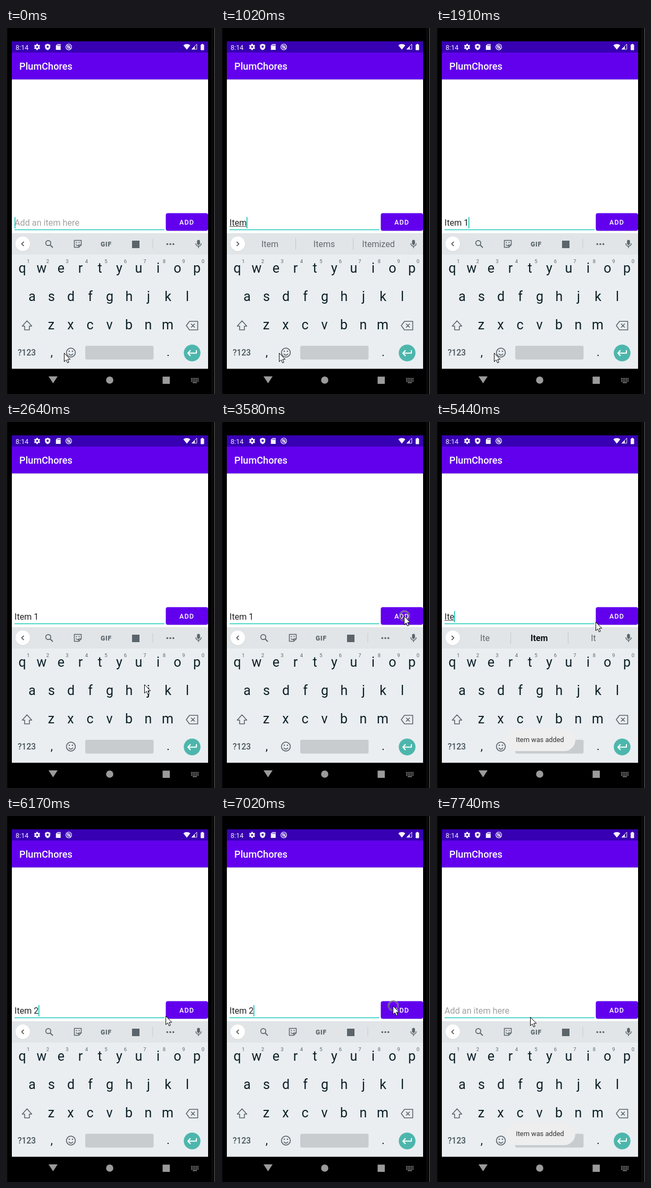
Recreate the animation shown at these times as an HTML page with a canvas. Size 393 px wide and 685 px high, loop 8000 ms.

```html
<!DOCTYPE html>
<html lang="en">
<head>
<meta charset="utf-8">
<title>To-do list demo</title>
<style>
html, body { margin: 0; width: 100%; height: 100%; overflow: hidden; background: #000; }
canvas { display: block; width: 393px; height: 685px; }
</style>
</head>
<body>
<canvas id="stage"></canvas>
<script>
const W = 393, H = 685, LOOP = 8000;
const canvas = document.getElementById('stage');
const ratio = window.devicePixelRatio || 1;
canvas.width = W * ratio;
canvas.height = H * ratio;
const c = canvas.getContext('2d');
c.scale(ratio, ratio);

const PURPLE = '#6200ee', TEAL = '#1bc9b8', ICON = '#5b656b', KEY = '#0d2027', NAV = '#9b9b9b';

const TICKS = [0, 440, 740, 880, 1020, 1320, 1910, 2060,
  2350, 2490, 2640, 2770, 2910, 3050, 3180, 3310,
  3440, 3590, 3740, 3880, 4030, 4180, 4720, 4860, 5010, 5150,
  5440, 5570, 5720, 5870, 6020, 6170,
  6620, 6760, 6890, 7020, 7170, 7310, 7450, 7590, 7740];

const TYPING = [[0, ''], [440, 'I'], [740, 'It'], [880, 'Ite'], [1020, 'Item'],
  [1320, 'Item '], [1910, 'Item 1'], [3590, ''], [4860, 'I'], [5150, 'It'],
  [5440, 'Ite'], [5570, 'Item'], [5870, 'Item '], [6020, 'Item 2'], [7170, '']];

const HINTS = {
  'I': ['I', 'I\'m', 'I\'ll'],
  'It': ['It', 'It\'s', 'Its'],
  'Ite': ['Ite', 'Item', 'It'],
  'Item': ['Item', 'Items', 'Itemized'],
  'Item ': ['is', 'number', 'in']
};

const POINTER = [[0, 110, 608], [2060, 110, 608], [2350, 140, 590], [2640, 261, 491],
  [2910, 322, 422], [3180, 347, 374], [3440, 345, 363], [3740, 341, 363],
  [4180, 301, 374], [6170, 301, 374], [6620, 304, 371], [7020, 324, 355],
  [7170, 324, 355], [7310, 300, 362], [7590, 187, 376], [7740, 178, 376], [8000, 178, 376]];

const CLICKS = [3440, 7020];
const TOASTS = [[3690, 5560], [7240, 9200]];

const clamp = v => Math.max(0, Math.min(1, v));
const latest = (list, t) => list.filter(e => e[0] <= t).pop();

function rect(x, y, w, h, color) {
  c.fillStyle = color;
  c.fillRect(x, y, w, h);
}

function round(x, y, w, h, r, color) {
  c.beginPath();
  c.roundRect(x, y, w, h, r);
  c.fillStyle = color;
  c.fill();
}

function disc(x, y, r, color) {
  c.beginPath();
  c.arc(x, y, r, 0, Math.PI * 2);
  c.fillStyle = color;
  c.fill();
}

function ring(x, y, r, color, width) {
  c.beginPath();
  c.arc(x, y, r, 0, Math.PI * 2);
  c.strokeStyle = color;
  c.lineWidth = width;
  c.stroke();
}

function line(d, x, y, color, width) {
  c.save();
  c.translate(x, y);
  c.strokeStyle = color;
  c.lineWidth = width;
  c.lineJoin = 'round';
  c.stroke(new Path2D(d));
  c.restore();
}

function shape(d, x, y, color) {
  c.save();
  c.translate(x, y);
  c.fillStyle = color;
  c.fill(new Path2D(d), 'evenodd');
  c.restore();
}

function text(s, x, y, size, color, align = 'left', weight = 400, spacing = 0) {
  c.font = `${weight} ${size}px Roboto, sans-serif`;
  c.letterSpacing = spacing + 'px';
  c.textAlign = align;
  c.fillStyle = color;
  c.fillText(s, x, y);
  const width = c.measureText(s).width;
  c.letterSpacing = '0px';
  return width;
}

function drawDevice() {
  rect(0, 0, W, H, '#000');
  rect(0, 0, 1, H, '#2a2a2a');
  rect(2, 0, 1, H, '#141414');
  rect(387, 0, 1, H, '#202020');
  rect(391, 0, 2, H, '#383838');
  rect(11, 25, 369, 613, '#fff');
  rect(11, 637.5, 369, 1, '#000');
  shape('M-8.5-6.5H8.5L0 6.5Z', 88.5, 658.5, NAV);
  disc(195, 659, 6.8, NAV);
  rect(294.5, 652.5, 13.5, 13.5, NAV);

  // keyboard switch, built from dots
  for (let i = 0; i < 5; i++) {
    for (let j = 0; j < 3; j++) rect(348 + i * 3, 655 + j * 2.7, 1.9, 1.6, NAV);
  }
  rect(351, 663, 8, 1.4, NAV);
}

function drawBars() {
  rect(11, 25, 369, 21, '#3700b3');
  rect(11, 46, 369, 50, PURPLE);
  rect(11, 96, 369, 1, '#c4b5dc');
  rect(11, 97, 369, 1, '#f6f6f6');
  text('8:14', 18, 41, 12.6, '#f4f0fb');
  text('PlumChores', 25, 78, 18.2, '#fff', 'left', 500);

  const light = '#f4f0fb';
  for (let i = 0; i < 6; i++) {
    c.save();
    c.translate(58.5, 35.5);
    c.rotate(i * Math.PI / 3);
    rect(-1.5, -5.8, 3, 4, light);
    c.restore();
  }
  ring(58.5, 35.5, 3.1, light, 2.4);
  shape('M0-6L5-4V0C5 3 3 5 0 6C-3 5-5 3-5 0V-4Z', 78.3, 35.5, light);
  disc(78.3, 35, 2, '#3700b3');
  shape('M-1.5-5.5H4.5V5.5H-4.5V-2.5Z', 98.3, 35.5, light);
  for (let i = 0; i < 3; i++) rect(96.8 + i * 2, 31.2, 1, 2.3, '#3700b3');
  ring(118, 35.5, 5.3, light, 1.3);
  ring(118, 35.5, 2.4, light, 1.2);
  line('M-3-3L4 4', 118, 35.5, light, 1.2);

  shape('M0 5.5L-6.5-2.5C-3-5.8 3-5.8 6.5-2.5Z', 340, 35, light);
  line('M-4.8 4.8H4.8V-4.8Z', 354, 35, light, 1);
  shape('M-5 5H1V-1Z', 354, 35, light);
  round(366, 31, 6.5, 10.5, 1, light);
  rect(367.8, 29.8, 3, 2, light);
}

function drawInput(value, cursorOn, composing) {
  const width = value
    ? text(value, 16, 370, 16.1, '#222')
    : (text('Add an item here', 16, 370, 16.2, '#a0a0a0'), 0);
  if (composing) rect(16, 371, width, 1, '#444');
  rect(16, 376.8, 282, 1.5, TEAL);
  if (cursorOn) rect(Math.round(16 + width), 354, 1.7, 21, TEAL);
}

function drawButton(t) {
  round(300.5, 347.5, 79.5, 32.8, 4, 'rgba(0,0,0,.12)');
  round(300.5, 346.5, 79.5, 33, 4, PURPLE);
  for (const start of CLICKS) {
    const age = t - start;
    if (age <= 0 || age > 420) continue;
    c.save();
    c.beginPath();
    c.roundRect(300.5, 346.5, 79.5, 33, 4);
    c.clip();
    disc(340, 363, 20 + age * .15, `rgba(255,255,255,${.24 * (1 - age / 440)})`);
    c.restore();
  }
  text('ADD', 326, 368, 12.6, '#fff', 'left', 500, 1.1);
}

function drawStrip(hints, value) {
  rect(11, 384, 369, 40, '#e1e5e7');
  disc(31.5, 404.7, 14, 'rgba(0,0,0,.1)');
  disc(31.5, 404, 13.7, '#fff');
  line(hints ? 'M-2-4L2 0L-2 4' : 'M2-4L-2 0L2 4', 31.5, 404, '#444', 1.6);

  // microphone
  round(359.3, 396.5, 5.4, 9.5, 2.7, ICON);
  line('M-5-1C-5 6 5 6 5-1M0 4.5V8', 362, 404, ICON, 1.5);

  if (hints) {
    rect(140, 393, 1, 22, '#c3c7ca');
    rect(248, 393, 1, 22, '#c3c7ca');
    hints.forEach((word, i) => {
      const best = value === 'Ite' && i === 1;
      text(word, 92 + i * 102, 410, 16, best ? '#111' : '#62696e', 'center', best ? 700 : 400);
    });
    return;
  }
  rect(275.5, 395, 1, 18, '#c8ccd0');
  ring(79.5, 402.5, 4.7, ICON, 1.7);
  line('M3 3L8 8', 80, 403, ICON, 2);
  line('M-6.5-6.5H6.5V2L2 6.5H-6.5ZM6.5 2H2V6.5M-3.5 1C-2 4 1 4 2.5 1.5', 135, 404, ICON, 1.5);
  disc(132.5, 401.7, 1.1, ICON);
  disc(137.5, 401.7, 1.1, ICON);
  text('GIF', 188.5, 408.5, 12, ICON, 'center', 900, .8);
  rect(237, 398, 14, 14, ICON);
  for (let i = -1; i <= 1; i++) disc(309 + i * 5.7, 404.5, 1.8, ICON);
}

function drawKeys() {
  rect(11, 424, 369, 213.5, '#eaeef1');
  const row = (letters, x, y) => [...letters].forEach((k, i) =>
    text(k, x + i * 36.5, y, 25, KEY, 'center'));
  row('qwertyuiop', 30.5, 458);
  row('asdfghjkl', 49, 511);
  row('zxcvbnm', 85, 564);
  [...'1234567890'].forEach((n, i) => text(n, 42 + i * 36.5, 440, 9.5, ICON, 'center'));

  line('M0-9L9 1H4.5V8H-4.5V1H-9Z', 39.5, 557, ICON, 1.6);
  line('M-11 0L-5-8H10.5V8H-5ZM-2-3.5L5 3.5M5-3.5L-2 3.5', 350, 557, ICON, 1.6);

  text('?123', 22, 613, 15.6, '#46545b', 'left', 500);
  text(',', 86, 614, 22, KEY, 'center');
  text('.', 305, 614, 22, KEY, 'center');
  ring(122, 607.5, 8.4, ICON, 1.7);
  disc(119, 605, 1.3, ICON);
  disc(125, 605, 1.3, ICON);
  line('M-4 2C-2.5 5.5 2.5 5.5 4 2', 122, 607.5, ICON, 1.6);
  round(149, 594.8, 128.5, 25.7, 3, '#c8cccf');
  disc(350, 608.2, 15.7, '#4db6ac');
  line('M8-5V0.5H-7.5M-3-4.8L-8 .5L-3 5.8', 350, 608, '#fff', 2);
}

function drawToast(t) {
  for (const [from, to] of TOASTS) {
    const alpha = clamp((t - from) / 400) * clamp((to + 300 - t) / 300);
    if (!alpha) continue;
    c.save();
    c.globalAlpha = alpha;
    round(131, 574, 131, 42, 21, '#eeeeef');
    text('Item was added', 195.5, 599, 12.8, '#333', 'center');
    c.restore();
  }
}

function pointerAt(t) {
  const i = POINTER.findIndex(p => p[0] > t);
  const a = POINTER[i - 1], b = POINTER[i];
  const k = (t - a[0]) / (b[0] - a[0]);
  return [a[1] + (b[1] - a[1]) * k, a[2] + (b[2] - a[2]) * k];
}

function drawPointer(t) {
  const [x, y] = pointerAt(t).map(Math.round);
  if (CLICKS.includes(t)) {
    ring(x, y, 9, 'rgba(255,255,255,.85)', 2.4);
    ring(x, y, 9, '#111', 1.2);
  }
  const arrow = 'M0 0V16L3.7 12.6L6.2 18.3L8.7 17.2L6.3 11.6H11.2Z';
  shape(arrow, x - .5, y + .5, '#fff');
  line(arrow, x - .5, y + .5, '#000', 1);
}

function draw(now) {
  const time = now % LOOP;
  const t = TICKS.filter(k => k <= time).pop();
  const [since, value] = latest(TYPING, t);
  const hints = HINTS[value];
  const cursorOn = (t - since + 60) % 1000 < 500;

  drawDevice();
  drawBars();
  drawInput(value, cursorOn, hints && !value.endsWith(' '));
  drawButton(t);
  drawStrip(hints, value);
  drawKeys();
  drawToast(t);
  drawPointer(t);
}

const begin = performance.now();
function loop() {
  draw(performance.now() - begin);
  requestAnimationFrame(loop);
}
loop();
</script>
</body>
</html>
```
